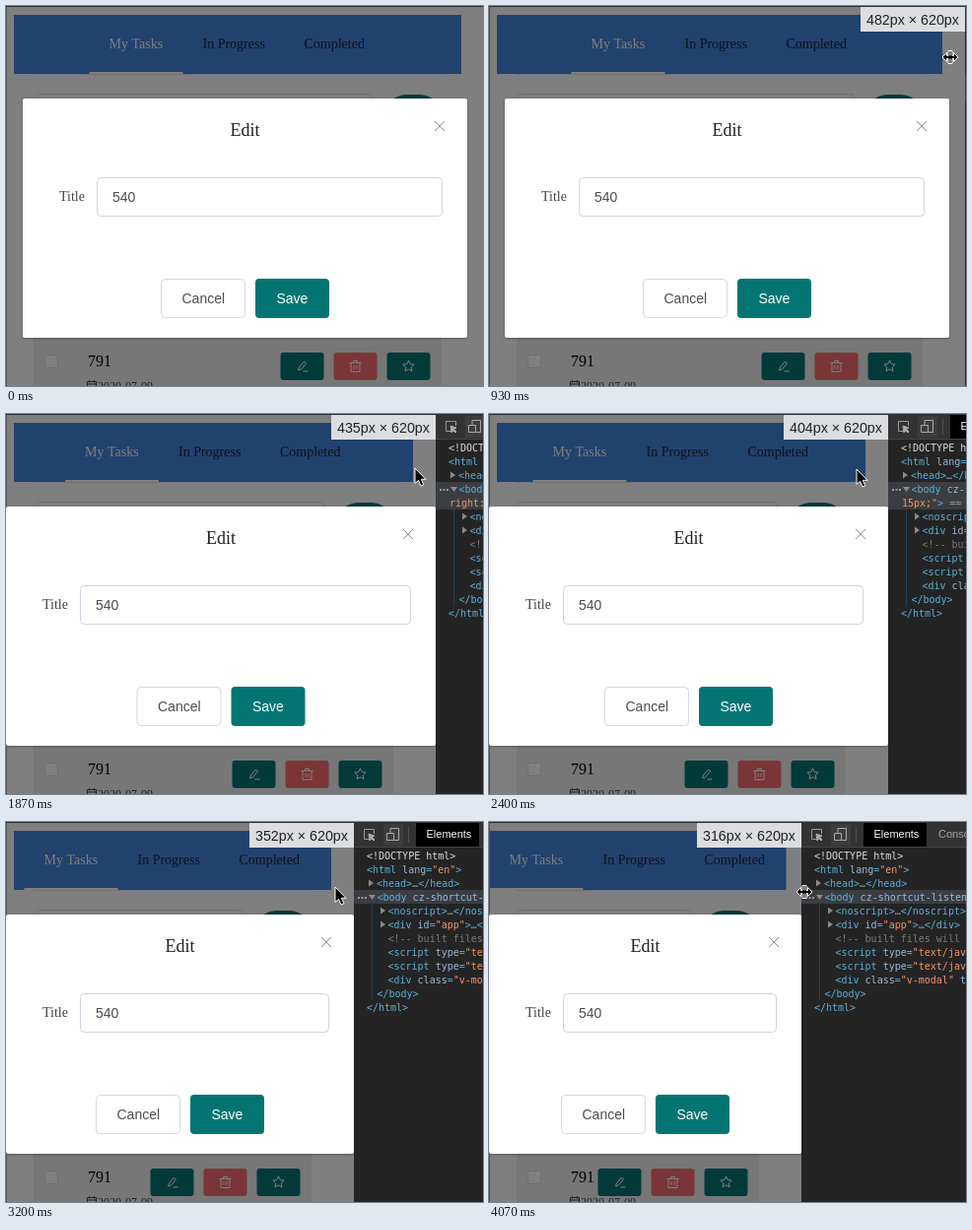
An HTML page with a canvas for the animation above (4.27 s loop, 484 px wide and 386 px high).

```html
<!DOCTYPE html>
<html lang="en">
<head>
<meta charset="utf-8">
<title>Resizing a dialog</title>
<style>
html, body { margin: 0; width: 100%; height: 100%; overflow: hidden; background: #808080; }
canvas { display: block; }
</style>
</head>
<body>
<canvas id="stage" width="484" height="386"></canvas>
<script>
const g = document.getElementById('stage').getContext('2d');
const LOOP = 4270, STEP = 200 / 3, FIRST = 8, LAST = 61;
const SERIF = '"Liberation Serif", serif', SANS = '"Liberation Sans", sans-serif';
const MONO = '10px "DejaVu Sans Mono", monospace';
const TEAL = '#027573';

// Keys: [step, value...], steps run at 15 per second
const widthKeys = [[8, 484], [14, 482], [18, 470], [23, 446], [28, 435], [31, 404], [36, 404],
  [39, 378], [41, 373], [47, 356], [48, 352], [55, 332], [61, 316]];
const pointerKeys = [[8, 482, 52], [14, 468, 52], [28, 415, 55], [36, 373, 56],
  [41, 357, 60], [48, 334, 66], [61, 320, 71]];

function at(keys, n, i = 1) {
  if (n <= keys[0][0]) return keys[0][i];
  const k = keys.findIndex(key => key[0] >= n);
  if (k < 0) return keys[keys.length - 1][i];
  const a = keys[k - 1], b = keys[k];
  return a[i] + (b[i] - a[i]) * (n - a[0]) / (b[0] - a[0]);
}

function rect(x, y, w, h, color) {
  g.fillStyle = color;
  g.fillRect(x, y, w, h);
}

function box(x, y, w, h, r, fill, border) {
  g.beginPath();
  if (border) g.roundRect(x + .5, y + .5, w - 1, h - 1, r);
  else g.roundRect(x, y, w, h, r);
  g.fillStyle = fill;
  g.fill();
  if (border) {
    g.lineWidth = 1;
    g.strokeStyle = border;
    g.stroke();
  }
}

function text(str, x, y, font, color, align = 'left') {
  g.font = font;
  g.fillStyle = color;
  g.textAlign = align;
  g.fillText(str, x, y);
}

function icon(path, x, y, color, fill) {
  g.save();
  g.translate(x, y);
  g.lineWidth = 1;
  g.strokeStyle = color;
  const shape = new Path2D(path);
  if (fill) {
    g.fillStyle = fill;
    g.fill(shape);
  }
  g.stroke(shape);
  g.restore();
}

const star = 'M' + Array.from({ length: 10 }, (_, i) => {
  const r = i % 2 ? 2.9 : 6, a = i * Math.PI / 5;
  return `${r * Math.sin(a)} ${-r * Math.cos(a)}`;
}).join('L') + 'Z';
const pencil = 'M-4 4L-3 1L2-5L4-3L-1 3ZM1 5H6';
const trash = 'M-6-3.5H6M-2-3.5V-5.5H2V-3.5M-4.5-3.5V5.5H4.5V-3.5M-1.5-1V3M1.5-1V3';
const calendar = 'M-4.5-3.5H4.5V5.5H-4.5ZM-4.5-1H4.5M-2.5-5V-2.5M2.5-5V-2.5';

function drawPage(w) {
  rect(0, 0, w + 1, 386, '#fff');
  const mid = (w - 14) / 2, tabs = mid - 150.5;
  rect(8, 9, w - 30, 60, '#4585dd');
  rect(tabs, 9, 301, 60, '#4585dd');
  rect(28, 69, w - 70, 1, '#e6e6e6');
  rect(tabs, 67, 95, 2, '#fff');
  text('My Tasks', tabs + 20, 43, '14px ' + SERIF, '#fff');
  text('In Progress', tabs + 115, 43, '14px ' + SERIF, '#1c2030');
  text('Completed', tabs + 218, 43, '14px ' + SERIF, '#1c2030');

  box(28, 89, w - 139, 40, 4, '#fff', '#dcdfe6');
  box(w - 98, 90, 54, 40, 20, TEAL);

  rect(28, 330, w - 70, 56, '#f0f0f0');
  box(39, 354, 14, 14, 2, '#fff', '#dcdfe6');
  text('791', 83, 366, '16px ' + SERIF, '#000');
  icon(calendar, 87, 385, '#444');
  text('2020-07-09', 93, 390, '12px ' + SERIF, '#444');
  [[pencil, TEAL], [trash, '#f56c6c'], [star, TEAL]].forEach(([path, color], i) => {
    const x = w - 205.5 + 54 * i;
    box(x, 352, 44, 28, 3, color);
    icon(path, x + 22, 366, '#fff');
  });
  rect(0, 0, w + 1, 386, 'rgba(0,0,0,.5)');
  rect(0, 0, 1, 386, '#555');
}

function drawDialog(view) {
  const w = Math.min(451, view), x = (view - w) / 2, mid = view / 2;
  g.save();
  g.shadowColor = 'rgba(0,0,0,.3)';
  g.shadowBlur = 3;
  g.shadowOffsetY = 1;
  box(x, 94, w, 243, 2, '#fff');
  g.restore();
  text('Edit', mid, 132, '18px ' + SERIF, '#222', 'center');
  icon('M-5-5L5 5M5-5L-5 5', x + w - 28, 122, '#909399');
  text('Title', x + 37, 198, '14px ' + SERIF, '#444');
  box(x + 75, 174, w - 100, 40, 4, '#fff', '#cfd5e3');
  text('540', x + 91, 199, '14px ' + SANS, '#4a4c50');
  box(mid - 85.5, 277, 86, 40, 4, '#fff', '#d4d8e0');
  text('Cancel', mid - 64, 302, '14px ' + SANS, '#4a4c50');
  box(mid + 10.5, 277, 75, 40, 4, TEAL);
  text('Save', mid + 32, 302, '14px ' + SANS, '#fff');
}

function tokenColor(token) {
  if (token.startsWith('<!-')) return '#7a7a7a';
  if (token.startsWith('<!')) return '#dcdcdc';
  if (token === '==' || token === '…') return '#a0a0a0';
  if (/^[<>=]/.test(token)) return '#5db0d7';
  return /"|:/.test(token) ? '#f29766' : '#9bbbdc';
}

function code(str, x, y) {
  g.font = MONO;
  const cell = g.measureText('m').width;
  for (const m of str.matchAll(/^<!.*|<\/?\w+|"[^"]*"|right:|\d+px;"|[\w$-]+|==|[>=]|…/g)) {
    text(m[0], x + m.index * cell, y, MONO, tokenColor(m[0]));
  }
}

function arrow(x, y, open) {
  g.fillStyle = '#8a8a8a';
  g.fill(new Path2D(open ? `M${x - 3} ${y - 2}h7l-3.5 5z` : `M${x - 2} ${y - 3.5}v7l5-3.5z`));
}

function drawInspector(x) {
  rect(x, 0, 484, 386, '#242424');
  rect(x, 0, 484, 25, '#333');
  rect(x, 25, 484, 1, '#454545');
  icon('M4 4.5H-4.5V-5.5H5.5V-1', x + 15, 13, '#999');
  icon('M0-1L6 1L3.5 2.5L6 5L5 6L2.5 3.5L1 6Z', x + 15, 13, '#aaa', '#aaa');
  rect(x + 30, 2, 20, 22, '#3d3d3d');
  icon('M-3-1V-6.5H5.5V5.5H1M-6.5-1.5H.5V5.5H-6.5Z', x + 40, 13, '#aaa');
  rect(x + 55, 5, 1, 16, '#505050');
  rect(x + 63, 1, 64, 24, '#000');
  text('Elements', x + 73.5, 16, '11px ' + SANS, '#fff');
  text('Console', x + 139, 16, '11px ' + SANS, '#a5a5a5');

  // The selected line wraps when the panel gets narrow
  const rest = x > 429 ? 'right: 15px;"> == $0' : x > 381 ? '15px;"> == $0' : '';
  const gap = rest ? 14 : 0;
  rect(x, 69, 484, 14 + gap, '#3a3d42');
  rect(x + 18, 83 + gap, 1, 98, '#20415f');
  code('<!DOCTYPE html>', x + 13, 38);
  code('<html lang="en">', x + 13, 52);
  arrow(x + 17, 62);
  code('<head>…</head>', x + 23, 66);
  for (let i = 0; i < 3; i++) rect(x + 4 + 3.5 * i, 76, 2, 2, '#999');
  arrow(x + 18, 76, true);
  code('<body cz-shortcut-listen="true">', x + 23.5, 80);
  code(rest, x + 14, 94);
  arrow(x + 29, 90 + gap);
  arrow(x + 29, 104 + gap);
  ['<noscript>…</noscript>', '<div id="app">…</div>',
    '<!-- built files will be auto injected -->',
    '<script type="text/javascript">', '<script type="text/javascript">',
    '<div class="v-modal" tabindex="0">'
  ].forEach((line, i) => code(line, x + 34.5, 94 + gap + 14 * i));
  code('</body>', x + 23.5, 178 + gap);
  code('</html>', x + 13, 192 + gap);
}

function drawPointer(n) {
  const x = at(pointerKeys, n, 1), y = at(pointerKeys, n, 2);
  if (n > 16 && n < 58) {
    icon('M0 0V15.5L3.5 12.3L6 18L8.8 16.8L6.4 11.3H11Z', x, y, '#fff', '#000');
  } else {
    icon('M-8 0L-3.5-4.5V-1.5H-2V-6.5H2V-1.5H3.5V-4.5L8 0L3.5 4.5V1.5H2V6.5H-2V1.5H-3.5V4.5Z',
      x, y, '#fff', '#000');
    rect(x - .5, y - 6, 1, 4.5, '#fff');
    rect(x - .5, y + 1.5, 1, 4.5, '#fff');
  }
}

function draw() {
  const time = performance.now() % LOOP;
  const n = Math.min(LAST, Math.floor((time + 4) / STEP));
  const w = Math.round(at(widthKeys, n)), view = w + 1;
  drawPage(w);
  drawDialog(view);
  if (w < 484) {
    drawInspector(view);
    rect(view - 106, 1, 106, 25, '#dcdde0');
    text(`${w}px × 620px`, view - 100, 19, '14.25px ' + SANS, '#222');
  }
  rect(0, 0, 484, 1, '#333');
  if (n >= FIRST) drawPointer(n);
  requestAnimationFrame(draw);
}
draw();
</script>
</body>
</html>
```
